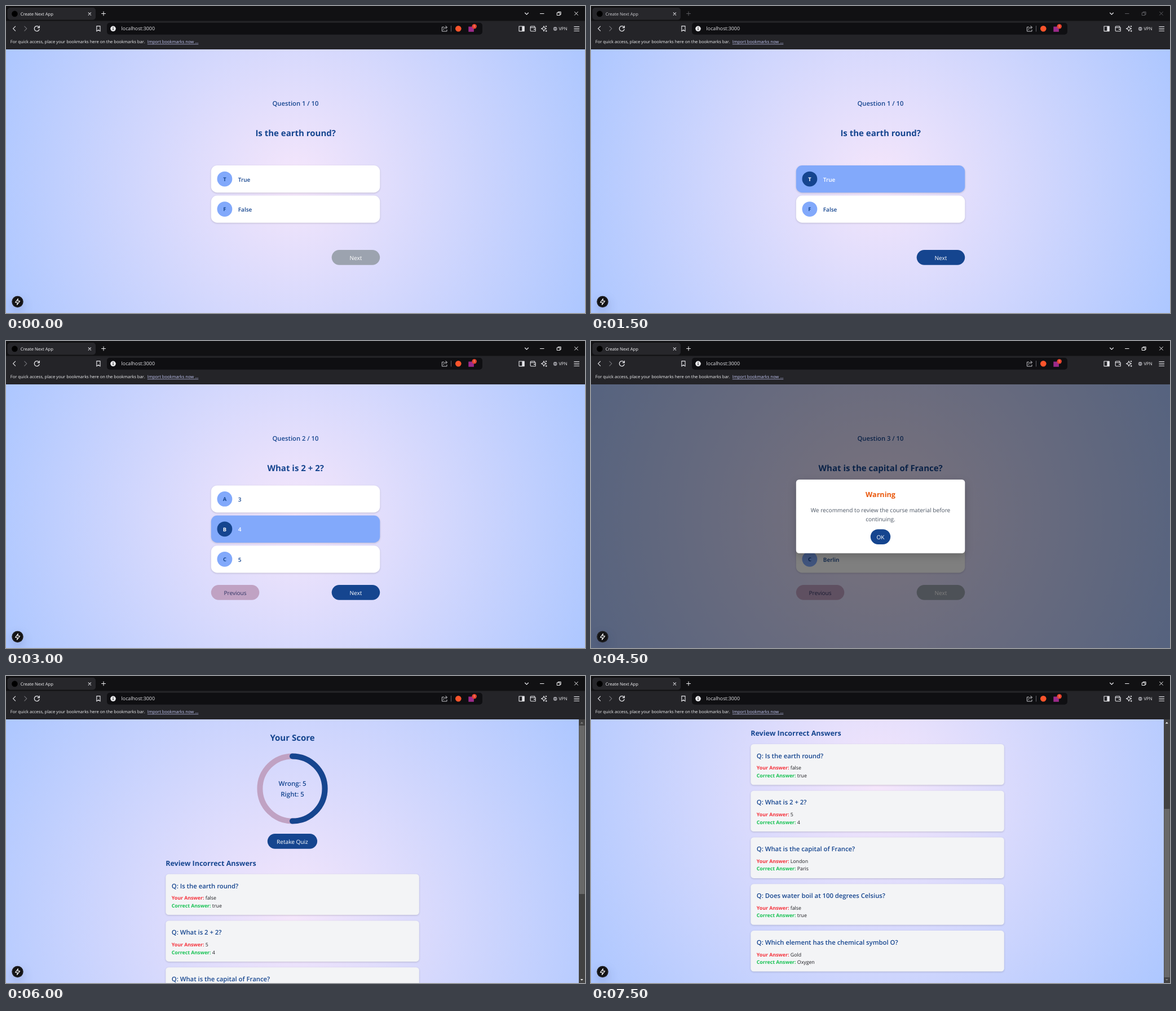
Recreate the animation shown at these times as an HTML page. Size 1027 px wide and 545 px high, loop 9000 ms.

```html
<!DOCTYPE html>
<html lang="en">
<head>
<meta charset="utf-8">
<title>Quiz</title>
<style>
html, body { margin: 0; width: 100%; height: 100%; overflow: hidden; background: #111113; }
svg { display: block; width: 100%; height: 100%; }
text { font-family: "Open Sans", "Noto Sans", sans-serif; text-rendering: geometricPrecision; white-space: pre; }
.card { filter: drop-shadow(0 1.6px 1.6px rgba(0,0,0,.17)); }
.modal { filter: drop-shadow(0 5px 7px rgba(0,0,0,.18)); }
.badge { filter: drop-shadow(0 8px 9px rgba(20,30,80,.2)); }
.line { fill: none; stroke: #e6e6ea; stroke-width: 1.1; stroke-linecap: round; stroke-linejoin: round; }
</style>
</head>
<body>
<svg viewBox="0 0 1027 545" xmlns="http://www.w3.org/2000/svg">
  <defs>
    <radialGradient id="quizBg" gradientUnits="userSpaceOnUse" cx="513.5" cy="311" r="564">
      <stop offset="0" stop-color="#f5e6fb"/><stop offset="1" stop-color="#adc7ff"/>
    </radialGradient>
    <radialGradient id="scoreBg" gradientUnits="userSpaceOnUse" cx="508" cy="426.5" r="617">
      <stop offset="0" stop-color="#f5e6fb"/><stop offset="1" stop-color="#adc7ff"/>
    </radialGradient>
  </defs>
  <g id="page"></g>
  <g id="chrome"></g>
</svg>
<script>
const STEP = 1500;
const NAVY = '#15458f', SKY = '#82a9fb', MAUVE = '#c0a2c3', GREY = '#9ca3af';

const rect = (x, y, w, h, fill, r = 0, extra = '') =>
  `<rect x="${x}" y="${y}" width="${w}" height="${h}" rx="${r}" fill="${fill}" ${extra}/>`;
const circle = (x, y, r, fill, extra = '') =>
  `<circle cx="${x}" cy="${y}" r="${r}" fill="${fill}" ${extra}/>`;
const line = (d, extra = '') => `<path class="line" d="${d}" ${extra}/>`;
const text = (x, y, size, str, fill = NAVY, weight = 400, anchor = 'start') =>
  `<text x="${x}" y="${y}" font-size="${size}" fill="${fill}" font-weight="${weight}" text-anchor="${anchor}">${str}</text>`;
const middle = (x, y, size, str, fill, weight) => text(x, y, size, str, fill, weight, 'middle');

const button = (x, y, w, label, fill, ink = '#fff') =>
  rect(x, y, w, 26.7, fill, 13.35) + middle(x + w / 2, y + 17.6, 10.1, label, ink);

function option(y, letter, label, picked) {
  return rect(363.8, y, 299.5, 48.1, picked ? SKY : '#fff', 10.7, 'class="card"') +
    circle(387.9, y + 24, 13.4, picked ? NAVY : SKY) +
    middle(387.9, y + 27.9, 9.3, letter, picked ? '#fff' : NAVY, 700) +
    text(411.8, y + 28.4, 10, label, picked ? '#fff' : NAVY, 600);
}

function quiz({ number, title, options, picked = -1 }) {
  const top = options.length === 2 ? 283.1 : 256.4;
  return rect(0, 77, 1027, 468, 'url(#quizBg)') +
    middle(513.5, 176.8, 11.25, `Question ${number} / 10`, NAVY, 600) +
    middle(513.7, 230.8, 15, title, NAVY, 700) +
    options.map(([letter, label], i) => option(top + i * 53.45, letter, label, i === picked)).join('') +
    (number > 1 ? button(363.8, 433, 85.5, 'Previous', MAUVE, '#2f3463') : '') +
    button(577.7, 433, 85.5, 'Next', picked < 0 ? GREY : NAVY);
}

function warning() {
  return rect(0, 77, 1027, 468, 'rgba(0,0,0,.5)') +
    rect(363.8, 246, 299.5, 130.8, '#fff', 5.3, 'class="modal"') +
    middle(513.5, 276.8, 12.6, 'Warning', '#ea580c', 700) +
    middle(513.5, 303.7, 10.1, 'We recommend to review the course material before', '#4b5563') +
    middle(513.5, 319.7, 10.1, 'continuing.', '#4b5563') +
    button(495.8, 334.2, 35.4, 'OK', NAVY);
}

const mistakes = [
  ['Is the earth round?', 'false', 'true'],
  ['What is 2 + 2?', '5', '4'],
  ['What is the capital of France?', 'London', 'Paris'],
  ['Does water boil at 100 degrees Celsius?', 'false', 'true'],
  ['Which element has the chemical symbol O?', 'Gold', 'Oxygen']
];

const answer = (y, label, color, value) =>
  `<text x="293.8" y="${y}" font-size="8.75" fill="#1b1b1f"><tspan font-weight="700" fill="${color}">${label}:</tspan> ${value}</text>`;

function review([question, given, correct], i) {
  const y = 351.7 + i * 82.8;
  return rect(283.3, y, 449.5, 72.4, '#f3f4f6', 5.3, 'class="card"') +
    text(293.8, y + 24.8, 11.3, 'Q: ' + question, NAVY, 600) +
    answer(y + 45.6, 'Your Answer', '#f5313b', given) +
    answer(y + 59, 'Correct Answer', '#16c253', correct);
}

function scrollbar(scroll) {
  const atTop = scroll === 0;
  const arrow = (y, dir, on) =>
    `<path d="M1018.8 ${y}h5l-2.5 ${-2.8 * dir}z" fill="${on ? '#f0f0f0' : '#808080'}"/>`;
  return rect(1016, 77, 11, 468, '#424242') +
    rect(1016.6, 88 + scroll * 0.641, 9.8, 299, '#686868') +
    arrow(84.4, 1, !atTop) + arrow(538, -1, atTop);
}

function score(scroll) {
  return `<g transform="translate(0 ${-scroll})">` +
    rect(0, 77, 1016, 699, 'url(#scoreBg)') +
    middle(508, 115.3, 15, 'Your Score', NAVY, 700) +
    circle(508, 200, 57.6, 'none', `stroke="${MAUVE}" stroke-width="10"`) +
    `<path d="M508 142.4a57.6 57.6 0 0 1 0 115.2" fill="none" stroke="${NAVY}" stroke-width="10" stroke-linecap="round"/>` +
    middle(508, 194.9, 11.5, 'Wrong: 5', NAVY, 600) +
    middle(508, 213.6, 11.5, 'Right: 5', NAVY, 600) +
    button(463.8, 280, 88.3, 'Retake Quiz', NAVY) +
    text(283.2, 337.3, 12.5, 'Review Incorrect Answers', NAVY, 700) +
    mistakes.map(review).join('') + '</g>' + scrollbar(scroll);
}

function badge() {
  return circle(20.5, 525, 10.2, '#131315', 'class="badge"') +
    circle(20.5, 525, 9.4, 'none', 'stroke="#38383c" stroke-width=".6"') +
    line('M21.4 519.7L16.6 526.2H20.3L19.6 530.4L24.6 523.8H20.8Z', 'style="stroke:#fff"');
}

function chrome(focused) {
  const ink = focused ? '#f1f1f3' : '#5c5c61';
  const tone = `style="stroke:${ink};stroke-width:1"`;
  return rect(0, 0, 1027, 27, '#111113') + rect(0, 26.5, 1027, 50.5, '#242428') +
    rect(2.5, 3, 156.5, 21.5, '#27272b', 5) +
    circle(15.4, 13.9, 5.3, '#000') +
    text(25.8, 16.6, 7.65, 'Create Next App', focused ? '#f4f4f6' : '#cfcfd3') +
    line('M146.2 11.8l4.4 4.4m0-4.4l-4.4 4.4') +
    line('M169.5 13.5h7m-3.5-3.5v7', tone) +
    line('M920.6 12.2l2.9 2.9l2.9-2.9', 'style="stroke-width:1.3"') +
    line('M947.5 13.5h6.6', tone) +
    line('M977.6 11.9h5v4.6h-5zM979.2 11.9v-1.5h5v4.8h-1.6', tone) +
    line('M1008.6 10.4l5.8 5.8m0-5.8l-5.8 5.8', tone) +
    // toolbar
    line('M16.6 36.2l-4 4l4 4') +
    line('M32.8 36.2l4 4l-4 4', 'style="stroke:#737378"') +
    line('M58.8 38.1a4.5 4.5 0 1 0 .3 3.3M59.3 35.4v3.2h-3.2', 'style="stroke-width:1.3"') +
    line('M160.8 35.6h6.2v9.3l-3.1-2.5l-3.1 2.5z') +
    rect(179, 29.8, 666, 21, '#0f0f12', 5) +
    circle(190, 40.3, 4.8, '#ededf0') +
    rect(189.4, 39.5, 1.2, 3.3, '#18181b') + circle(190, 37.9, .75, '#18181b') +
    text(204.6, 43.4, 8.8, 'localhost:3000', '#e4e4e8') +
    line('M776.6 37.3h-3.2v7.6h8.6v-2.6M776 42c.3-3 2.2-4.1 5.4-4.1M779.8 35.6l2.9 2.3l-2.9 2.4', 'style="stroke:#c8c8cc;stroke-width:1"') +
    rect(789, 35, .9, 10.5, '#6a6a70') +
    circle(802.3, 40.3, 5.3, '#fb542b') +
    rect(820.3, 36.6, 9.6, 9.2, '#9b2a8a') +
    circle(830.7, 36.3, 4.2, '#e6442e') + middle(830.7, 38.3, 5.4, '1', '#fff') +
    line('M910 36h9.2v8.6h-9.2z') + rect(915.3, 36, 4, 8.6, '#e6e6ea') +
    line('M930.2 37.2v6.4q0 1.2 1.2 1.2h7.8v-6.6h-7.8q-1.2 0-1.2-1.1t1.2-1.1h6.4v2M936.4 41.4h2.8') +
    line('M954 35.6l1.4 3.2l3.2 1.4l-3.2 1.4l-1.4 3.2l-1.4-3.2l-3.2-1.4l3.2-1.4zM958 35.3v1.6m-.8-.8h1.6M958.2 43.2v2.2m-1.1-1.1h2.2') +
    circle(974.2, 40.5, 3.4, '#97979d') + rect(972.2, 40, 4, 1, '#3a3a3f') +
    text(980.4, 43.3, 7.8, 'VPN', '#ededf0') +
    line('M1007.8 36.9h8.8m-8.8 3.7h8.8m-8.8 3.7h8.8') +
    // bookmarks bar
    text(7.8, 66.4, 7.55, 'For quick access, place your bookmarks here on the bookmarks bar.', '#f1f1f3') +
    text(250.8, 66.4, 7.55, 'Import bookmarks now ...', '#c5c9f7') +
    rect(250.8, 67.5, 90.5, .7, '#c5c9f7');
}

const round = [['T', 'True'], ['F', 'False']];
const sum = [['A', '3'], ['B', '4'], ['C', '5']];
const capital = [['A', 'London'], ['B', 'Paris'], ['C', 'Berlin']];
const scenes = [
  () => quiz({ number: 1, title: 'Is the earth round?', options: round }),
  () => quiz({ number: 1, title: 'Is the earth round?', options: round, picked: 0 }),
  () => quiz({ number: 2, title: 'What is 2 + 2?', options: sum, picked: 1 }),
  () => quiz({ number: 3, title: 'What is the capital of France?', options: capital }) + warning(),
  () => score(0),
  () => score(230.8)
];

const pageEl = document.getElementById('page');
const chromeEl = document.getElementById('chrome');
let shown = -1;

function render(ms) {
  const i = Math.floor(ms / STEP) % scenes.length;
  if (i === shown) return;
  shown = i;
  pageEl.innerHTML = scenes[i]() + badge();
  chromeEl.innerHTML = chrome(i !== 1);
}

const start = performance.now();
function tick() {
  render(performance.now() - start);
  requestAnimationFrame(tick);
}
tick();
</script>
</body>
</html>
```
